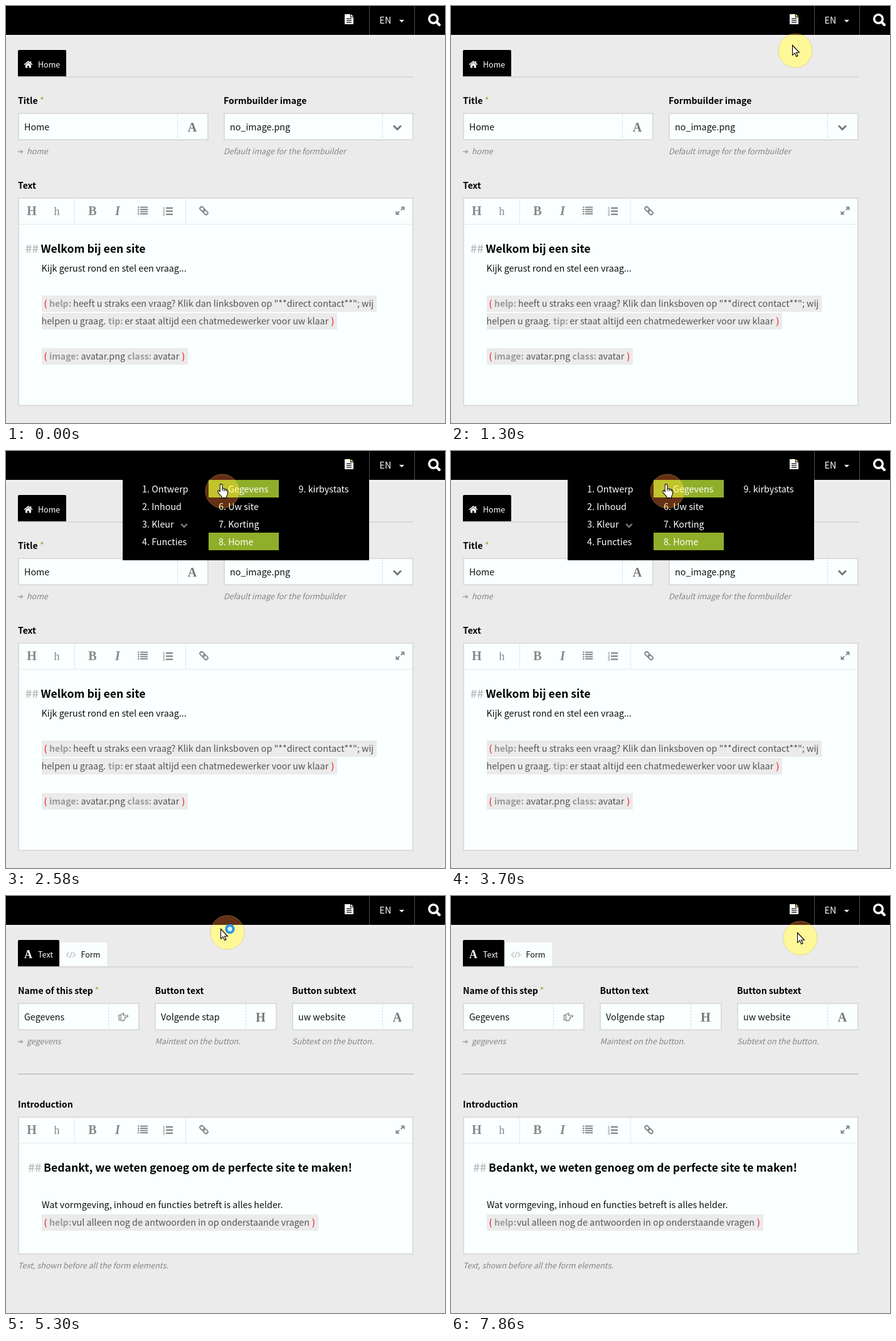
Write an HTML page with a canvas that moves like this. It is 700 px wide and 664 px high and loops after 8000 ms.

```html
<!DOCTYPE html>
<html lang="nl">
<head>
<meta charset="utf-8">
<title>Form panel</title>
<style>
  html, body { margin: 0; width: 100%; height: 100%; overflow: hidden; background: #ebebeb; }
  canvas { display: block; }
</style>
</head>
<body>
<canvas id="stage" width="700" height="664"></canvas>
<script>
const ctx = document.getElementById('stage').getContext('2d');
const LOOP = 8000;
const SANS = '"Noto Sans CJK JP", "Noto Sans CJK SC", "Noto Sans CJK", "Noto Sans", sans-serif';
const SERIF = '"Liberation Serif", serif';
const BG = '#ebebeb', PAPER = '#faffff', EDGE = '#dcdcdc', GREEN = '#8fae2a', ICON = '#858888';

// Basic helpers
function rect(x, y, w, h, color) {
  ctx.fillStyle = color;
  ctx.fillRect(x, y, w, h);
}

function text(str, x, y, { px = 16, weight = 400, color = '#111', italic = false } = {}) {
  const size = px * (weight > 500 ? 0.88 : 0.895);
  ctx.font = `${italic ? 'italic ' : ''}${weight} ${size}px ${SANS}`;
  ctx.fillStyle = color;
  ctx.fillText(str, x, y);
}

const label = (str, x, y) => text(str, x, y, { weight: 600, color: '#000' });
const hint = (str, x, y = 236) => text(str, x, y, { px: 14, italic: true, color: '#858585' });

function serif(ch, cx, y, style = 'bold 20px', color = ICON) {
  ctx.font = `${style} ${SERIF}`;
  ctx.fillStyle = color;
  ctx.textAlign = 'center';
  ctx.fillText(ch, cx, y);
  ctx.textAlign = 'left';
}

function line(points, color, width = 1, close = false) {
  ctx.beginPath();
  points.forEach(([x, y]) => ctx.lineTo(x, y));
  if (close) ctx.closePath();
  ctx.strokeStyle = color;
  ctx.lineWidth = width;
  ctx.stroke();
}

function poly(points, color) {
  ctx.beginPath();
  points.forEach(([x, y]) => ctx.lineTo(x, y));
  ctx.fillStyle = color;
  ctx.fill();
}

function circle(x, y, r) {
  ctx.beginPath();
  ctx.arc(x, y, r, 0, Math.PI * 2);
}

// Icons
function chevron(x, y, r, color, width) {
  line([[x - r, y - r / 2], [x, y + r / 2], [x + r, y - r / 2]], color, width);
}

function codeIcon(x, y, color) {
  line([[x - 3, y - 4], [x - 7, y], [x - 3, y + 4]], color, 1.2);
  line([[x + 3, y - 4], [x + 7, y], [x + 3, y + 4]], color, 1.2);
  line([[x + 1.5, y - 5], [x - 1.5, y + 5]], color, 1.2);
}

function homeIcon(x, y) {
  line([[x, y + 6], [x + 6.5, y + 0.8], [x + 13, y + 6]], '#fff', 1.6);
  poly([[x + 6.5, y + 2.6], [x + 11, y + 6.2], [x + 11, y + 11], [x + 7.8, y + 11],
    [x + 7.8, y + 7.6], [x + 5.2, y + 7.6], [x + 5.2, y + 11], [x + 2, y + 11], [x + 2, y + 6.2]], '#fff');
  rect(x + 9.5, y + 0.5, 1.7, 3.5, '#fff');
}

function pageIcon(back, corner) {
  poly([[540, 13], [549, 13], [549, 18], [554, 18], [554, 29], [540, 29]], '#fff');
  poly([[550, 13], [554, 17], [550, 17]], corner);
  [20, 23, 26].forEach(y => rect(543, y - 0.5, 8, 1.2, back));
}

function searchIcon() {
  circle(681.5, 20.5, 6.8);
  ctx.strokeStyle = '#fff';
  ctx.lineWidth = 3.5;
  ctx.stroke();
  ctx.lineCap = 'round';
  line([[687, 26], [691, 30]], '#fff', 4.2);
  ctx.lineCap = 'butt';
}

function linkIcon(x, y) {
  ctx.save();
  ctx.translate(x, y);
  ctx.rotate(Math.PI / 4);
  ctx.strokeStyle = ICON;
  ctx.lineWidth = 1.9;
  for (const dx of [-7.8, -0.8]) {
    ctx.beginPath();
    ctx.roundRect(dx, -2.7, 8.6, 5.4, 2.7);
    ctx.stroke();
  }
  ctx.restore();
}

function expandIcon(x, y) {
  line([[x - 5, y + 4.5], [x - 1.2, y + 1]], ICON, 2);
  line([[x + 5, y - 4.5], [x + 1.2, y - 1]], ICON, 2);
  poly([[x + 7, y - 6.5], [x + 7, y], [x + 0.8, y - 6.5]], ICON);
  poly([[x - 7, y + 6.5], [x - 7, y], [x - 0.8, y + 6.5]], ICON);
}

const pointer = new Path2D('M.7 3.5H3.5L7 .8Q9 .2 8.3 2.6L7.5 4H14Q16 5.2 14 6.5H10.5Q11.5 8 10 8.8Q10.5 10.5 9 11Q9 12.6 7.5 12.6H5L3.5 11.5H.7ZM3.6 3.8V11.2');
function pointIcon(x, y) {
  ctx.save();
  ctx.translate(x, y);
  ctx.strokeStyle = '#777';
  ctx.lineWidth = 1.2;
  ctx.stroke(pointer);
  ctx.restore();
}

// Form parts
function field(x, w, value, split, icon) {
  rect(x, 170, w, 44, EDGE);
  rect(x + 2, 172, w - 4, 40, PAPER);
  ctx.setLineDash([3, 2]);
  line([[split + 0.5, 172], [split + 0.5, 212]], '#d4d8d8');
  ctx.setLineDash([]);
  text(value, x + 10, 198);
  icon(split + 24);
}

const letterIcon = ch => cx => serif(ch, cx, 199.5, 'bold 20px', '#777');

function slugHint(str) {
  line([[19, 232], [26.5, 232]], '#777');
  line([[23.5, 229], [26.5, 232], [23.5, 235]], '#777');
  hint(str, 33);
}

function star(x) {
  text('*', x, 156, { color: GREEN });
}

function editor(y, h) {
  rect(19, y, 631, h, EDGE);
  rect(21, y + 2, 627, h - 4, PAPER);
  rect(21, y + 42, 627, 1, '#e4e8e8');
  [109, 286].forEach(x => rect(x, y + 2, 1, 40, '#e4e8e8'));
  const base = y + 28;
  serif('H', 41, base);
  serif('h', 81, base, '18px');
  serif('B', 138, base);
  serif('I', 178, base, 'italic bold 20px');
  for (let i = 0; i < 4; i++) {
    const row = y + 14.5 + i * 3.5;
    rect(210, row, 2.5, 2, ICON);
    rect(214, row, 12, 2, ICON);
  }
  ctx.font = 'bold 6px "Liberation Sans", sans-serif';
  for (let i = 0; i < 3; i++) {
    const row = y + 16 + i * 5;
    ctx.fillStyle = ICON;
    ctx.fillText(i + 1, 250, row + 3);
    rect(255, row - 0.5, 11, 2.4, ICON);
  }
  linkIcon(315.5, y + 21);
  expandIcon(628.5, y + 21);
}

function heading(str, x, y) {
  text('##', x, y, { px: 20, weight: 600, color: '#bbbfbf' });
  text(str, x + 24.5, y, { px: 20, weight: 600, color: '#000' });
}

const paren = (ch, x, y) => text(ch, x, y, { color: '#f00' });
const key = (str, x, y) => text(str, x, y, { weight: 700, color: '#999' });
const soft = (str, x, y) => text(str, x, y, { color: '#555' });
const band = (y, right) => rect(57, y, right - 57, 26, BG);

function tab(x, w, y, h, color) {
  ctx.beginPath();
  ctx.roundRect(x, y, w, h, [2, 2, 0, 0]);
  ctx.fillStyle = color;
  ctx.fill();
}

const tabText = (str, x, color) => text(str, x, 98, { px: 14, weight: 500, color });
const tabRule = y => rect(19, y, 631, 2, '#d9d9d9');

// Pages
function homePage() {
  tabRule(112);
  tab(19, 77, 70, 42, '#000');
  homeIcon(29, 87.5);
  tabText('Home', 51, '#fff');

  label('Title', 19, 156);
  star(54);
  label('Formbuilder image', 347, 156);
  field(19, 304, 'Home', 273, letterIcon('A'));
  field(347, 303, 'no_image.png', 600, cx => chevron(cx, 193.5, 6, '#777', 3));
  slugHint('home');
  hint('Default image for the formbuilder', 347);

  label('Text', 19, 291);
  editor(305, 332);
  heading('Welkom bij een site', 31, 393);
  text('Kijk gerust rond en stel een vraag...', 56.5, 423);

  band(461, 591);
  paren('(', 60.5, 479);
  key('help:', 69, 479);
  soft('heeft u straks een vraag? Klik dan linksboven op "**direct contact**"; wij', 107, 479);
  band(489, 528);
  soft('helpen u graag.', 56.5, 507);
  key('tip:', 163, 507);
  soft('er staat altijd een chatmedewerker voor uw klaar', 189.3, 507);
  paren(')', 518.5, 507);
  band(545, 290);
  paren('(', 60.5, 563);
  key('image:', 69, 563);
  soft('avatar.png', 119.5, 563);
  key('class:', 193.5, 563);
  soft('avatar', 234.5, 563);
  paren(')', 280.5, 563);
}

function emptyPage() {
  tab(19, 66, 74, 34, PAPER);
  tab(86, 75, 74, 34, PAPER);
  tabRule(108);
  serif('A', 35.5, 99, 'bold 18px', '#b5b9b9');
  tabText('Text', 51, '#111');
  codeIcon(103.5, 93.5, '#b5b9b9');
  tabText('Form', 119.5, '#111');
}

function stepPage() {
  tabRule(112);
  tab(19, 66, 70, 42, '#000');
  tab(86, 75, 74, 38, PAPER);
  serif('A', 35.5, 99, 'bold 18px', '#fff');
  tabText('Text', 51, '#fff');
  codeIcon(103.5, 93.5, '#b5b9b9');
  tabText('Form', 119.5, '#111');

  label('Name of this step', 19, 156);
  star(141.5);
  label('Button text', 237.5, 156);
  label('Button subtext', 456, 156);
  field(19, 194, 'Gegevens', 163, cx => pointIcon(cx - 7.5, 186));
  field(237, 195, 'Volgende stap', 382, letterIcon('H'));
  field(456, 194, 'uw website', 600, letterIcon('A'));
  slugHint('gegevens');
  hint('Maintext on the button.', 237.5);
  hint('Subtext on the button.', 456);
  rect(19, 283, 631, 1, '#aaa');

  label('Introduction', 19, 337);
  editor(351, 220);
  heading('Bedankt, we weten genoeg om de perfecte site te maken!', 35.5, 439);
  text('Wat vormgeving, inhoud en functies betreft is alles helder.', 57, 497);
  band(507, 498);
  paren('(', 60.5, 525);
  key('help:', 69, 525);
  soft('vul alleen nog de antwoorden in op onderstaande vragen', 105, 525);
  paren(')', 488, 525);
  hint('Text, shown before all the form elements.', 19, 593);
}

function header(t) {
  const hover = t >= 1460 && t < 2100;
  const plain = t < 500 || (t >= 5300 && t < 5460);
  const shade = ctx.createLinearGradient(0, 46, 0, 52);
  shade.addColorStop(0, '#f5f1f5');
  shade.addColorStop(1, BG);
  rect(0, 46, 700, 6, shade);
  rect(698, 46, 2, 618, '#f1eff1');
  rect(0, 0, 700, 46, '#000');
  if (hover) rect(515, 0, 64, 46, GREEN);
  [579, 651].forEach(x => rect(x, 0, 1, 46, '#505050'));
  pageIcon(hover ? GREEN : '#000', plain || hover ? '#fff' : '#ffd84a');
  text('EN', 595.5, 28, { color: '#fff' });
  poly([[627, 22], [635, 22], [631, 26]], '#fff');
  searchIcon();
}

const items = ['Ontwerp', 'Inhoud', 'Kleur', 'Functies', 'Gegevens', 'Uw site', 'Korting', 'Home', 'kirbystats'];
const columns = [217, 339, 466.5];

function menu(t) {
  rect(186, 46, 393, 128, '#000');
  rect(323, 130, 112, 28, GREEN);
  if (t >= 2100 && t < 2420) rect(451, 46, 112, 28, GREEN);
  if (t >= 2420) rect(323, 46, 112, 28, GREEN);
  items.forEach((name, i) => {
    text(`${i + 1}. ${name}`, columns[i >> 2], 66 + (i % 4) * 28, { weight: 500, color: '#fff' });
  });
  chevron(284, 118.5, 4.8, '#777', 2.6);
}

// Cursor: [time, halo x, halo y, shape]
const moves = [
  [500, 66, 645, 'arrow'], [660, 160, 532, 'arrow'], [820, 305, 361, 'arrow'],
  [980, 437, 204, 'arrow'], [1140, 519, 107, 'arrow'], [1300, 549, 71, 'arrow'],
  [1460, 547, 27, 'hand'], [1620, 547, 34, 'hand'], [1940, 540, 57, 'hand'],
  [2100, 500, 70, 'hand'], [2420, 415, 66, 'hand'], [2580, 345, 64, 'hand'],
  [5300, 353, 58, 'busy'], [6100, 362, 62, 'arrow'], [6260, 400, 70, 'arrow'],
  [6420, 455, 74, 'arrow'], [6580, 505, 74, 'arrow'], [6740, 530, 71, 'arrow'],
  [7700, 541, 69, 'arrow'], [7860, 557, 67, 'arrow']
];
const arrow = new Path2D('M.5 .5V16.3L4.1 12.9L6.6 18.5L9 17.5L6.5 12H11.4Z');
const hand = new Path2D('M6 .6Q8 .6 8 2.6V7.6Q10.4 7 11 8.6Q13.2 8 14 9.6Q16.5 9.4 16.5 12V15Q16.2 18 14.7 20V22.6H6.8V20.4Q3 17 .8 13.2Q.2 11 2.2 10.8L4.2 12.6V2.6Q4.2 .6 6 .6ZM8 7.6V11.5M11 8.6V12M14 9.6V12.5');

function shape(path, x, y) {
  ctx.save();
  ctx.translate(x, y);
  ctx.fillStyle = '#fff';
  ctx.fill(path);
  ctx.strokeStyle = '#000';
  ctx.lineWidth = 1.1;
  ctx.stroke(path);
  ctx.restore();
}

function halo(x, y) {
  circle(x, y, 27);
  ctx.globalCompositeOperation = 'multiply';
  ctx.fillStyle = 'rgb(168,217,141)';
  ctx.fill();
  ctx.globalCompositeOperation = 'lighter';
  ctx.fillStyle = 'rgb(100,48,22)';
  ctx.fill();
  ctx.globalCompositeOperation = 'source-over';
  ctx.strokeStyle = 'rgba(205,180,70,.4)';
  ctx.lineWidth = 1;
  ctx.stroke();
}

function cursor(t) {
  const now = moves.filter(m => m[0] <= t).pop();
  if (!now) return;
  const [, x, y, kind] = now;
  halo(x, y);
  if (t >= 3220 && t < 3700) {
    const step = Math.floor((t - 3220) / 160);
    circle(342, 52, 4 + step * 3);
    ctx.strokeStyle = `rgba(230,50,30,${0.8 - step * 0.2})`;
    ctx.lineWidth = 1.5;
    ctx.stroke();
  }
  if (kind === 'hand') shape(hand, x - 8, y - 12);
  if (kind === 'arrow') shape(arrow, x - 5, y - 9);
  if (kind === 'busy') {
    shape(arrow, x - 11, y - 6);
    circle(x + 4, y - 5.5, 5.7);
    ctx.fillStyle = '#d9f0fb';
    ctx.fill();
    ctx.strokeStyle = '#3096e0';
    ctx.lineWidth = 4;
    ctx.stroke();
  }
}

function draw(now) {
  const t = now % LOOP;
  rect(0, 0, 700, 664, BG);
  header(t);
  if (t < 5140) homePage();
  else if (t < 5300) emptyPage();
  else stepPage();
  if (t >= 1460 && t < 5140) menu(t);
  cursor(t);
  requestAnimationFrame(draw);
}
requestAnimationFrame(draw);
</script>
</body>
</html>
```
